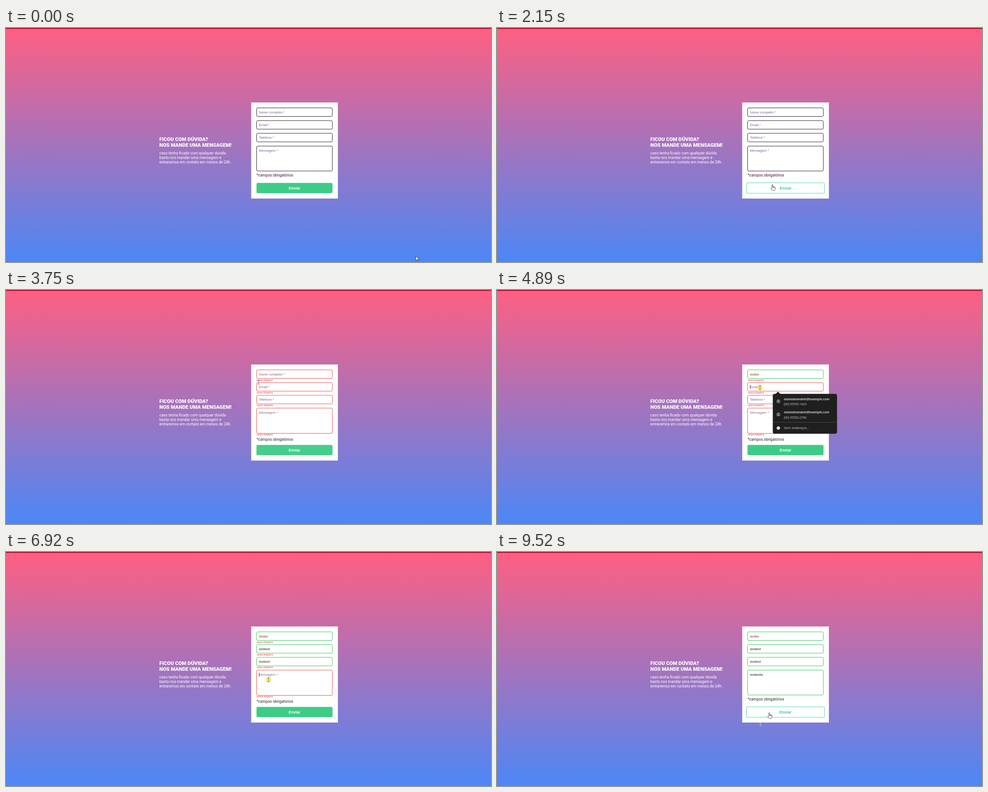
Animation, 1077 px wide and 520 px high, one loop 9.59 s. Source, as an HTML page:

```html
<!DOCTYPE html>
<html lang="pt-BR">
<head>
<meta charset="utf-8">
<title>Formulário de contato</title>
<style>
html, body { margin: 0; width: 100%; height: 100%; overflow: hidden; }
body { background: linear-gradient(#ff5f82, #4b87f6); }
svg { display: block; width: 1077px; height: 520px; }
text { white-space: pre; }
.title { font: 900 11.22px Roboto, sans-serif; fill: #fff; }
.body { font: 400 8.46px Roboto, sans-serif; fill: #fff; }
.input { font: 400 7.48px "Liberation Sans", Arial, sans-serif; }
.note { font: 400 8.42px Roboto, sans-serif; }
.error { font: 400 4.49px Roboto, sans-serif; fill: #e8302f; }
.send { font: 700 8.42px "Liberation Sans", Arial, sans-serif; text-anchor: middle; }
.strong { font: 600 6.9px "Open Sans", sans-serif; fill: #f2f2f2; }
.plain { font: 400 6.75px "Open Sans", sans-serif; fill: #d2d2d2; }
</style>
</head>
<body>
<svg id="stage" viewBox="0 0 1077 520"></svg>
<script>
const LOOP = 9590;
const stage = document.getElementById('stage');

function el(tag, attrs, parent = stage, content) {
  const node = document.createElementNS('http://www.w3.org/2000/svg', tag);
  for (const key in attrs) node.setAttribute(key, attrs[key]);
  if (content) node.textContent = content;
  parent.appendChild(node);
  return node;
}
const set = (node, attrs) => { for (const key in attrs) node.setAttribute(key, attrs[key]); };
const show = (node, on) => node.setAttribute('visibility', on ? 'visible' : 'hidden');
const label = (cls, x, y, content, parent) => el('text', { class: cls, x, y }, parent, content);
const within = (t, a, b) => t >= a && t < b;

// keys: [time, value, value...], linear between neighbours
function track(keys, t) {
  if (t <= keys[0][0]) return keys[0].slice(1);
  for (let i = 1; i < keys.length; i++) {
    const a = keys[i - 1], b = keys[i];
    if (t < b[0]) {
      const k = (t - a[0]) / (b[0] - a[0]);
      return a.slice(1).map((v, j) => v + (b[j + 1] - v) * k);
    }
  }
  return keys[keys.length - 1].slice(1);
}
const mix = (a, b, k) => `rgb(${a.map((v, i) => Math.round(v + (b[i] - v) * k))})`;

// Page
el('rect', { width: 1077, height: 2, fill: '#ad0c2c' });
label('title', 340.5, 250.6, 'FICOU COM DÚVIDA?');
label('title', 340.5, 264.1, 'NOS MANDE UMA MENSAGEM!');
['caso tenha ficado com qualquer dúvida',
 'basta nos mandar uma mensagem e',
 'entraremos em contato em menos de 24h.'
].forEach((line, i) => label('body', 340.5, 281.2 + i * 10.1, line));
const smear = el('rect', { x: 583.5, y: 379, width: 3, height: 8.5, fill: '#78bfa6' });
el('rect', { x: 544.5, y: 165.5, width: 192.5, height: 213.5, fill: '#fff' });

// Form
const SENT = 2720, DONE = 8770;
const fields = [
  { hint: 'Nome completo *', value: 'asdas', y: 177.5, focus: 3960, type: 4150, step: 90, blur: 4800, ink: '#8a3a30' },
  { hint: 'Email *', value: 'asdasd', y: 205.8, focus: 4800, type: 5100, step: 80, blur: 5890, ink: '#3a2018' },
  { hint: 'Telefone *', value: 'asdasd', y: 234, focus: 5890, type: 6150, step: 75, blur: 6840, ink: '#4a2418' },
  { hint: 'Mensagem *', value: 'asdasda', y: 262.4, focus: 6840, type: 7020, step: 65, blur: 8700, ink: '#2a2622' }
];
fields.forEach((f, i) => {
  f.area = i === 3;
  f.box = el('rect', { x: 556.5, y: f.y, width: 168.2, height: 19, rx: 2.6, fill: '#fff', 'stroke-width': 1 });
  f.text = label('input', 561.8, 0, f.hint);
  f.error = label('error', 556.5, f.area ? 323.1 : f.y + 24.1, 'campo obrigatório');
});
const caret = el('rect', { width: .8, height: 8.8, fill: '#111' });
const note = label('note', 556.5, 330, '*campos obrigatórios');

const button = el('g', {});
const plate = el('rect', { x: 556.3, y: 344.2, width: 168.7, height: 22.8, rx: 3 }, button);
const send = label('send', 640.7, 358.8, 'Enviar', button);

// Autofill popups
function popup(x2, y1, y2) {
  const g = el('g', {});
  el('rect', { x: 612.3, y: y1 + .8, width: x2 - 612, height: y2 - y1, rx: 4.5, fill: '#000', opacity: .22 }, g);
  el('path', { d: `M618 ${y1 + 1}L624 ${y1 - 5}L630 ${y1 + 1}Z`, fill: '#1f1f1f' }, g);
  el('rect', { x: 612.5, y: y1, width: x2 - 612.5, height: y2 - y1, rx: 4, fill: '#1f1f1f' }, g);
  return g;
}
function manage(g, x2, y) {
  el('rect', { x: 612.5, y: y - 13.2, width: x2 - 612.5, height: .8, fill: '#5a5a5a' }, g);
  el('circle', { cx: 624.8, cy: y, r: 3.8, fill: '#dcdcdc' }, g);
  label('plain', 637, y + 2.5, 'Gerir endereços...', g);
}
function person(g, y) {
  el('circle', { cx: 624.8, cy: y, r: 3.5, fill: 'none', stroke: '#ddd', 'stroke-width': .8 }, g);
  el('circle', { cx: 624.8, cy: y - .9, r: 1.2, fill: '#ddd' }, g);
  el('path', { d: `M622.4 ${y + 2.3}Q624.8 ${y - .3} 627.2 ${y + 2.3}`, fill: 'none', stroke: '#ddd', 'stroke-width': .9 }, g);
}
const phones = ['(00) 95550-1423', '(00) 95550-2760'];

const mailList = popup(755, 230.7, 319.3);
phones.forEach((phone, i) => {
  const y = 247.2 + i * 29.3;
  person(mailList, y);
  label('strong', 637, y - 2.3, 'otaviobrandele@example.com', mailList);
  label('plain', 637, y + 9, phone, mailList);
});
manage(mailList, 755, 306.8);

const phoneList = popup(707.3, 259, 329);
phones.forEach((phone, i) => label('strong', 619, 273.8 + i * 20.6, phone, phoneList));
manage(phoneList, 707.3, 317);

const wordList = popup(700.6, 323.7, 348.6);
label('strong', 619, 338.8, 'asdasdasd', wordList);

// Pointer
const glow = el('circle', { r: 6, fill: '#f7e338', opacity: .72 });
const pointer = el('g', {});
const arrow = el('path', {
  d: 'M0 0V9.6L2.2 7.6L3.7 11L5.3 10.3L3.8 7H6.8Z',
  fill: '#fff', stroke: '#222', 'stroke-width': .8, 'stroke-linejoin': 'round'
}, pointer);
const hand = el('path', {
  d: 'M-1.3 8V1Q-1.3 0 -.3 0Q.7 0 .7 1V4.6Q1.5 4 2.4 5Q3.3 4.5 4.1 5.5Q5.8 5.2 5.8 7V9.4Q5.8 11.6 4.4 13H-.7Q-2 11 -3.7 9Q-4.3 7.8 -3.3 7.3Q-2.3 7 -1.3 8ZM.7 4.6V6.8M2.4 5V7M4.1 5.5V7.2',
  fill: '#fff', stroke: '#333', 'stroke-width': .85, 'stroke-linejoin': 'round'
}, pointer);
const beam = el('g', { fill: 'none' }, pointer);
const beamPath = 'M-2.2 -4.6Q0 -4.6 0 -3.6Q0 -4.6 2.2 -4.6M0 -3.8V3.8M-2.2 4.6Q0 4.6 0 3.6Q0 4.6 2.2 4.6';
el('path', { d: beamPath, stroke: '#fff', 'stroke-width': 1.8, opacity: .6 }, beam);
el('path', { d: beamPath, stroke: '#444', 'stroke-width': .85 }, beam);

const path = [
  [0, 910, 507], [60, 910, 507], [210, 721, 419], [400, 721, 419],
  [800, 672, 366], [1320, 649, 360], [1900, 625, 350], [2150, 612, 348],
  [2290, 611, 349], [2430, 609, 351], [3000, 609, 351], [3380, 583, 343],
  [3610, 557, 215], [3750, 561, 205], [3950, 580, 189], [4620, 580, 189],
  [4780, 584, 217], [5640, 584, 217], [5860, 583, 241], [6650, 583, 241],
  [6810, 583, 284], [7430, 583, 284], [7600, 585, 360], [7740, 585, 380],
  [7850, 587, 379], [7980, 597, 366], [8120, 605, 357], [9500, 605, 357]
];
const hover = [
  [800, 0], [1000, .7], [1200, 1], [3390, 1], [3560, .35], [3740, .05], [3820, 0],
  [7570, 0], [7680, .25], [7860, 0], [7990, 0], [8160, .4], [8300, .85], [8400, 1]
];
const clicks = [2650, 3960, 4800, 5890, 6840, 8700];

function drawFields(t) {
  const bad = within(t, SENT, DONE);
  let active = false;
  for (const f of fields) {
    const typed = Math.max(0, Math.min(f.value.length, Math.floor((t - f.type) / f.step) + 1));
    const good = t >= (f.area ? DONE : f.blur);
    const base = f.y + 12.1 + (f.area ? (bad ? .9 : .2) : 0);
    set(f.box, {
      stroke: good ? '#35c656' : t >= SENT ? '#f24d4d' : '#28222c',
      height: f.area ? (bad ? 56.2 : 55.4) : 19
    });
    f.text.textContent = typed ? f.value.slice(0, typed) : f.hint;
    set(f.text, { y: base, fill: typed ? f.ink : f.area && bad ? '#7b7b80' : '#79639f' });
    show(f.error, bad);
    if (within(t, f.focus, f.blur)) {
      const last = typed ? f.type + (typed - 1) * f.step : f.focus;
      active = Math.floor((t - last) / 530) % 2 === 0;
      set(caret, { x: 561.8 + (typed ? f.text.getComputedTextLength() : 0), y: base - 7 });
    }
  }
  show(caret, active);
  set(note, { y: bad ? 335 : 330, fill: t < SENT ? '#3d0f35' : '#252525' });
}

function drawButton(t) {
  const [h] = track(hover, t);
  const green = [61, 204, 133], white = [255, 255, 255];
  const s = 1 + .026 * h;
  set(button, { transform: `translate(640.7 355.6) scale(${s}) translate(-640.7 -355.6)` });
  set(plate, { fill: mix(green, white, h), stroke: '#4fd2a2', 'stroke-opacity': h * h * h });
  set(send, { fill: mix(white, green, h) });
}

function drawPointer(t) {
  const [x, y] = track(path, t);
  const onButton = x > 555 && x < 727 && y > 343 && y < 368;
  const onText = x > 556 && x < 725 && y > 177 && y < 338;
  set(pointer, { transform: `translate(${x} ${y})` });
  show(hand, onButton);
  show(beam, !onButton && onText);
  show(arrow, !onButton && !onText);
  set(glow, { cx: x, cy: y });
  show(glow, clicks.some(c => within(t, c, c + 180)));
}

function draw(t) {
  drawFields(t);
  drawButton(t);
  drawPointer(t);
  show(mailList, within(t, 4800, 5100));
  show(phoneList, within(t, 5890, 6150));
  show(wordList, within(t, 7020, 8700));
  show(smear, t >= 7800);
}

const start = performance.now();
function tick(now) {
  draw(Math.max(0, now - start) % LOOP);
  requestAnimationFrame(tick);
}
draw(0);
requestAnimationFrame(tick);
</script>
</body>
</html>
```
